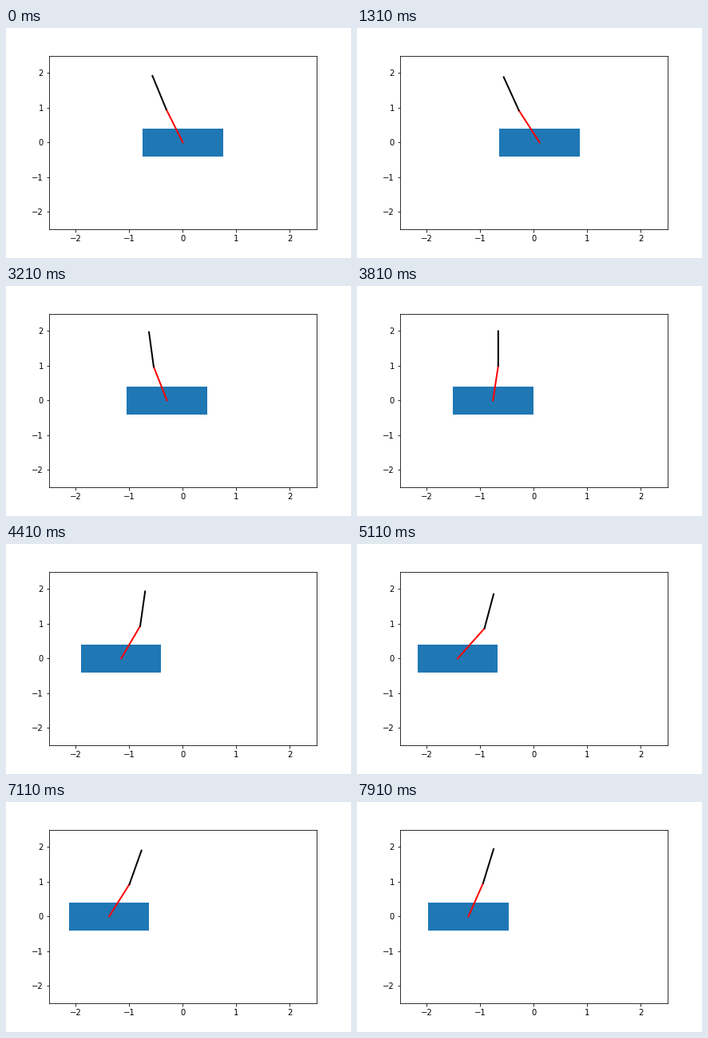
Write a matplotlib script that moves like this. It is 432 px wide and 288 px high and loops after 8 s.

```python
import numpy as np
import matplotlib.pyplot as plt
from matplotlib.animation import FuncAnimation
from matplotlib.patches import Rectangle

FRAMES, INTERVAL = 80, 100
HOLD = 9                      # extra still frames before the motion starts
CART_W, CART_H = 1.5, 0.8

# key poses: step, cart position, lower and upper rod angles from the vertical
KEY_STEP = np.array([0, 8, 13, 23, 35, 50, 62, 70])
CART_KEYS = [0, 0.277, 0.3, -0.297, -1.153, -1.515, -1.378, -1.223]
LOWER_KEYS = [-np.pi / 10, -0.56, -0.68, -0.25, 0.364, 0.542, 0.389, 0.279]
UPPER_KEYS = [-np.pi / 12, -0.3, -0.217, -0.088, 0.092, 0.222, 0.228, 0.197]


def spline(t, knots, values):
    """Cubic spline that starts at rest and ends without curvature."""
    values = np.asarray(values, float)
    n, h = len(knots), np.diff(knots)
    rate = np.diff(values) / h
    a, b = np.eye(n), np.zeros(n)
    for i in range(1, n - 1):
        a[i, i - 1:i + 2] = 1 / h[i - 1], 2 / h[i - 1] + 2 / h[i], 1 / h[i]
        b[i] = 3 * (rate[i - 1] / h[i - 1] + rate[i] / h[i])
    a[-1, -2:] = 1, 2
    b[-1] = 3 * rate[-1]
    slope = np.linalg.solve(a, b)

    i = np.clip(np.searchsorted(knots, t, side="right") - 1, 0, n - 2)
    u = (t - knots[i]) / h[i]
    ease = u * u * (3 - 2 * u)
    bend = u * (1 - u) * ((1 - u) * slope[i] - u * slope[i + 1])
    return values[i] + ease * (values[i + 1] - values[i]) + h[i] * bend


steps = np.maximum(np.arange(FRAMES) - HOLD, 0)
cart_x, lower, upper = (spline(steps, KEY_STEP, keys)
                        for keys in (CART_KEYS, LOWER_KEYS, UPPER_KEYS))

fig, ax = plt.subplots(figsize=(6, 4), dpi=72)
fig.subplots_adjust(left=0.125, right=0.9, bottom=0.125, top=0.88)
ax.set(xlim=(-2.5, 2.5), ylim=(-2.5, 2.5),
       xticks=range(-2, 3), yticks=range(-2, 3))

cart = ax.add_patch(Rectangle((0, -CART_H / 2), CART_W, CART_H, color="C0", lw=0))
rod1, = ax.plot([], [], color="red", lw=2)
rod2, = ax.plot([], [], color="black", lw=2)


def update(i):
    x = cart_x[i]
    jx, jy = x + np.sin(lower[i]), np.cos(lower[i])
    tx, ty = jx + np.sin(upper[i]), jy + np.cos(upper[i])
    cart.set_x(x - CART_W / 2)
    rod1.set_data([x, jx], [0, jy])
    rod2.set_data([jx, tx], [jy, ty])
    return cart, rod1, rod2


anim = FuncAnimation(fig, update, frames=FRAMES, interval=INTERVAL,
                     init_func=lambda: update(0), repeat=True, repeat_delay=0)
plt.show()
```
